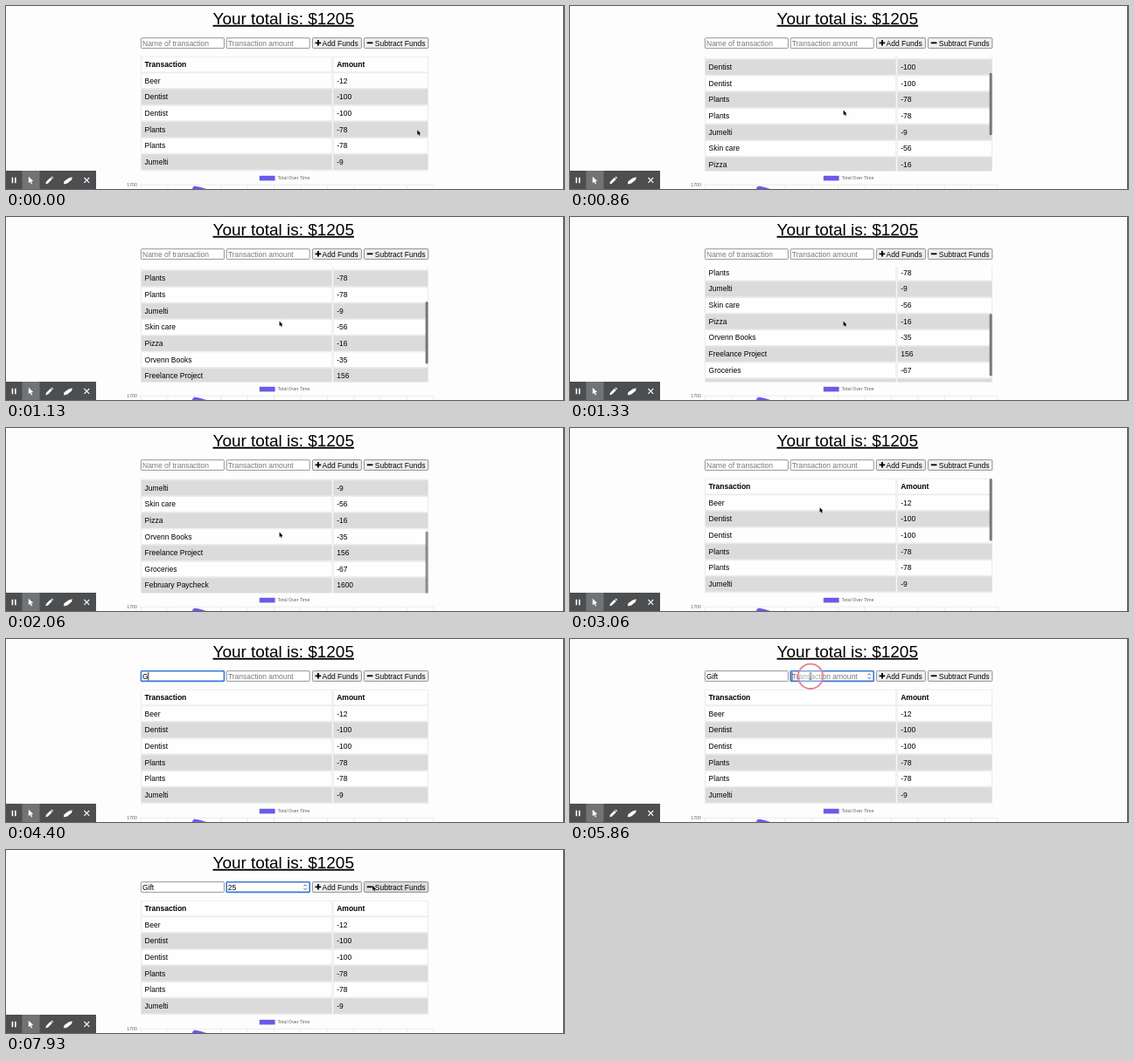
An HTML page for the animation above (8 s loop, 638x210 px).

```html
<!DOCTYPE html>
<html lang="en">
<head>
<meta charset="utf-8">
<title>Budget tracker</title>
<style>
html, body { margin: 0; width: 100%; height: 100%; overflow: hidden; background: #fdfdfd; }
svg { display: block; width: 638px; height: 210px; font: 8.5px "Liberation Sans", Arial, sans-serif; }
text { white-space: pre; }
.hint { fill: #777; }
.small { font-size: 5.3px; fill: #666; }
.field { fill: #fff; stroke: #8a8a8a; stroke-width: .9; }
.field.on { stroke: #3a78d8; stroke-width: 1.6; }
.button { fill: #efefef; stroke: #777; stroke-width: .8; }
.button.on { fill: #dcdcdc; }
.cell { fill: #fefefe; stroke: #e6e6e6; stroke-width: .8; }
.cell.odd { fill: #dadbda; }
</style>
</head>
<body>
<svg viewBox="0 0 638 210">
  <defs><clipPath id="view"><rect x="154" y="57.5" width="329.5" height="132"/></clipPath></defs>
  <text x="236.5" y="20.8" font-size="18.95" text-decoration="underline">Your total is: $1205</text>

  <g id="fields"></g>
  <path id="spin" d="M340.4 41.6l1.8-1.9 1.8 1.9M340.4 43.8l1.8 1.9 1.8-1.9" fill="none" stroke="#555" stroke-width=".9"/>
  <rect id="caret" y="38.2" width=".8" height="9.4"/>

  <rect class="button" x="350.4" y="36.6" width="56" height="11.8" rx="1"/>
  <path d="M353.6 42.3h6.6M356.9 39v6.6" stroke="#000" stroke-width="1.8"/>
  <text x="361.6" y="45.5">Add Funds</text>
  <rect id="subtract" class="button" x="409.4" y="36.6" width="73.4" height="11.8" rx="1"/>
  <path d="M412.8 42.3h6.6" stroke="#000" stroke-width="1.8"/>
  <text x="421.8" y="45.5">Subtract Funds</text>

  <g clip-path="url(#view)">
    <g id="rows"></g>
    <rect id="thumb" x="479.6" width="3" height="71.5" rx="1.5" fill="#777"/>
  </g>

  <rect x="289.8" y="194.8" width="17.8" height="5.6" fill="#6a5be8"/>
  <text class="small" x="310.4" y="199.3">Total Over Time</text>
  <text class="small" x="138.2" y="206.6">1700</text>
  <path id="grid" fill="none" stroke="#e2e2e2" stroke-width=".7"/>
  <path d="M212.8 210Q214 206.6 215.5 206.7Q221 207 229 210Z" fill="#6a5be8"/>

  <path d="M0 189H103V210H0Z" fill="#4c4e50"/>
  <path d="M18.5 189H38.5V210H18.5Z" fill="#717375"/>
  <g fill="#fff">
    <path d="M6.6 196.8h1.6v6.4h-1.6ZM10 196.8h1.6v6.4h-1.6Z"/>
    <path d="M25.8 195.8l5.4 5.2-2.4.2 1.4 2.8-1.2.6-1.4-2.9-1.8 1.6Z"/>
    <path d="M45.4 204.2l.5-2.4 5-5 1.9 1.9-5 5ZM51.5 196.2l.9-.8 1.9 1.9-.9.8Z"/>
    <path d="M66.4 201.2l5.2-3.8 4.2-1.2-.8 3.4-4.8 3.8-4.2 1Z"/>
  </g>
  <path d="M89.4 197l5.8 5.8M95.2 197l-5.8 5.8" stroke="#fff" stroke-width="1.1"/>
  <path d="M637.5 0V210" stroke="#555"/>

  <circle id="ring" fill="#fff" fill-opacity=".35" stroke="#e5838b" stroke-width="1.8"/>
  <path id="arrow" d="M0 0V5.6L1.3 4.5 2.2 6.5 3.2 6.1 2.3 4.1H4Z" stroke="#fff" stroke-width=".7" paint-order="stroke"/>
  <path id="beam" d="M-1.3-4Q0-4 0-3Q0-4 1.3-4M0-3V3M-1.3 4Q0 4 0 3Q0 4 1.3 4" fill="none" stroke="#555" stroke-width=".8"/>
</svg>
<script>
const LOOP = 8000, PITCH = 18.65, BLINK = 540, CLICKS = [3510, 5850];
const $ = id => document.getElementById(id);

function add(parent, tag, attrs, text = "") {
  const el = document.createElementNS("http://www.w3.org/2000/svg", tag);
  for (const key in attrs) el.setAttribute(key, attrs[key]);
  el.textContent = text;
  return parent.appendChild(el);
}
const set = (el, attrs) => { for (const key in attrs) el.setAttribute(key, attrs[key]); };
const show = (el, on) => el.setAttribute("visibility", on ? "visible" : "hidden");

const table = [
  ["Transaction", "Amount"], ["Beer", -12], ["Dentist", -100], ["Dentist", -100],
  ["Plants", -78], ["Plants", -78], ["Jumelti", -9], ["Skin care", -56], ["Pizza", -16],
  ["Orvenn Books", -35], ["Freelance Project", 156], ["Groceries", -67], ["February Paycheck", 1600]
];
table.forEach((row, i) => {
  const y = 58.2 + i * PITCH;
  [[154.6, 218.2], [374.2, 108.2]].forEach(([x, width], col) => {
    const odd = i && i % 2 === 0 ? " odd" : "";
    add($("rows"), "rect", { class: "cell" + odd, x, y, width, height: 17.7 });
    add($("rows"), "text", { x: x + 4, y: y + 11.7, "font-weight": i ? 400 : 700 }, row[col]);
  });
});

let grid = "M151.5 205.2H489";
for (let i = 0; i < 12; i++) grid += `M${154.6 + i * 30.4} 205.2V210`;
set($("grid"), { d: grid });

// keys: [time, characters typed]
const inputs = [
  { x: 154.4, hint: "Name of transaction", value: "Gift", keys: [4400, 4600, 4930, 5060] },
  { x: 252.2, hint: "Transaction amount", value: "25", keys: [6800, 7060] }
];
for (const f of inputs) {
  f.box = add($("fields"), "rect", { x: f.x, y: 36.7, width: 95, height: 11.7, rx: .8 });
  f.text = add($("fields"), "text", { x: f.x + 1.6, y: 45.5 });
}

// Linear interpolation through [time, ...values]
function track(points, t) {
  if (t <= points[0][0]) return points[0].slice(1);
  for (let i = 1; i < points.length; i++) {
    const a = points[i - 1], b = points[i];
    if (t < b[0]) {
      const k = (t - a[0]) / (b[0] - a[0]);
      return a.slice(1).map((v, j) => v + (b[j + 1] - v) * k);
    }
  }
  return points[points.length - 1].slice(1);
}

const scrolling = [[560, 0], [600, 3], [860, 34], [1130, 71], [1400, 105], [1530, 110.2],
  [2070, 110.2], [2200, 94], [2500, 16], [2660, 0]];
const thumbAlpha = [[560, 0], [600, 1], [2000, 1], [2060, .8], [2130, 1], [3130, 1], [3400, 0]];
const pointer = [[30, 470.3, 142.3], [130, 432, 137], [230, 345, 124], [330, 312.6, 119.6],
  [3000, 312.6, 119.6], [3060, 285.8, 91.4], [3440, 185, 42.5], [5420, 185, 42.5],
  [5760, 275, 42.8], [7430, 275, 42.8], [7920, 419.2, 40.8]];

function draw(t) {
  const [scroll] = track(scrolling, t);
  set($("rows"), { transform: `translate(0 ${-scroll})` });
  set($("thumb"), { y: 58 + scroll * .55, opacity: track(thumbAlpha, t)[0] });

  const focus = t < CLICKS[0] ? -1 : t < CLICKS[1] ? 0 : 1;
  inputs.forEach((f, i) => {
    const typed = f.keys.filter(k => k <= t).length;
    f.text.textContent = typed ? f.value.slice(0, typed) : f.hint;
    set(f.text, { class: typed ? "" : "hint" });
    set(f.box, { class: i === focus ? "field on" : "field" });
    if (i === focus) {
      const last = typed ? f.keys[typed - 1] : CLICKS[i];
      const width = typed ? f.text.getComputedTextLength() : 0;
      set($("caret"), { x: f.x + 1.4 + width });
      show($("caret"), (t - last) % (2 * BLINK) < BLINK);
    }
  });
  if (focus < 0) show($("caret"), false);
  show($("spin"), focus === 1);

  const [x, y] = track(pointer, t);
  const typing = (t >= 4400 && t < 5430) || (t >= 6800 && t < 7440);
  const overField = y > 36 && y < 49 && x > 154 && x < 347;
  set($("arrow"), { transform: `translate(${x} ${y})` });
  set($("beam"), { transform: `translate(${x} ${y})` });
  show($("arrow"), !typing && !overField);
  show($("beam"), !typing && overField);
  set($("subtract"), { class: x > 409 && y < 49 ? "button on" : "button" });

  const age = t - CLICKS[Math.max(focus, 0)] + 50;
  const ringOn = age >= 0 && age < 320;
  show($("ring"), ringOn);
  if (ringOn) set($("ring"), {
    cx: x, cy: y, r: Math.min(14.2, 11 + age * .055), opacity: Math.min(1, (320 - age) / 200)
  });
}

function frame(now) {
  draw(now % LOOP);
  requestAnimationFrame(frame);
}
draw(0);
requestAnimationFrame(frame);
</script>
</body>
</html>
```
